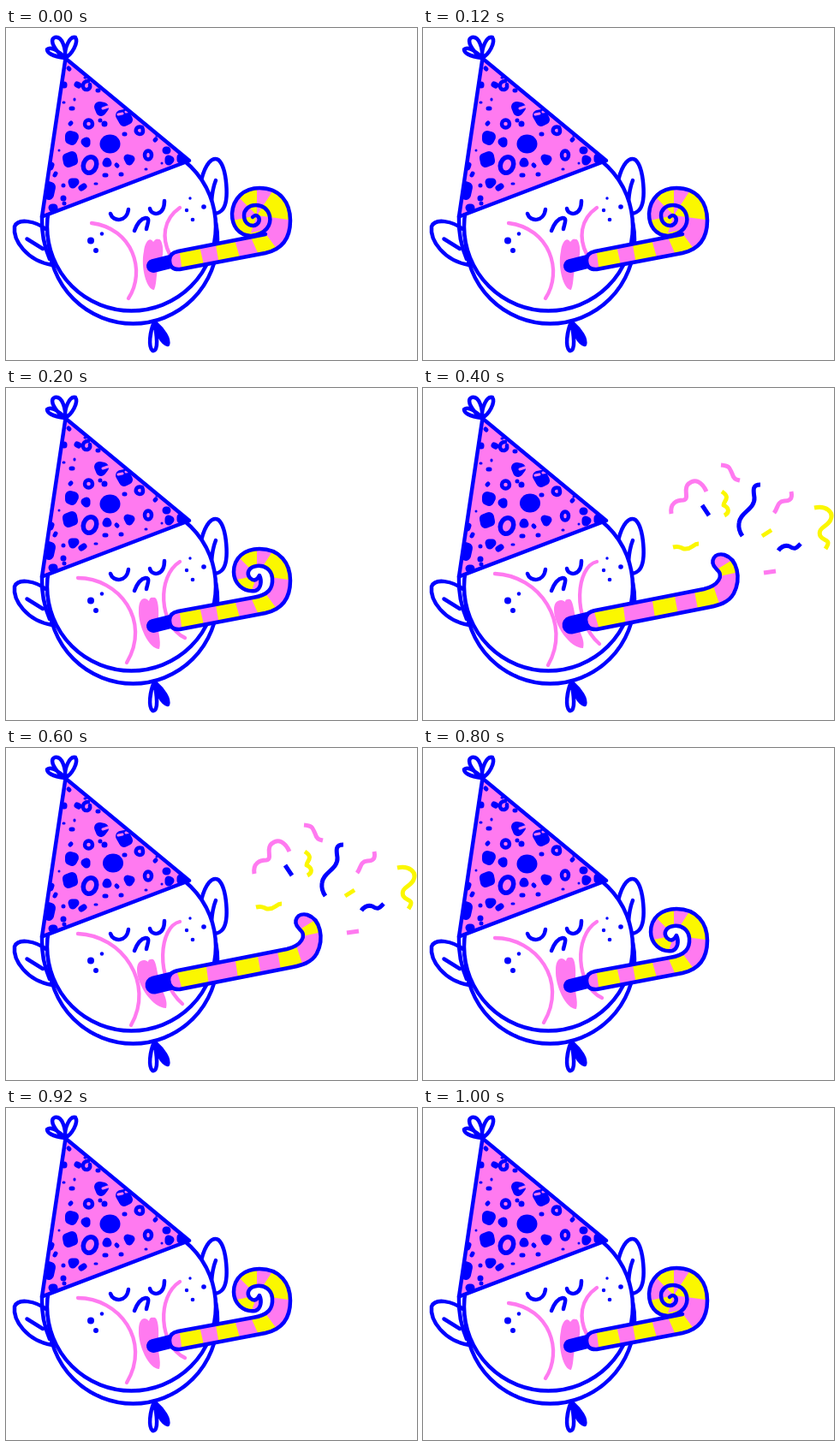
An HTML page that plays this animation: 480x388 px, repeating every 1200 ms.

```html
<!DOCTYPE html>
<html lang="en">
<head>
<meta charset="utf-8">
<title>Party blower</title>
<style>
  html, body { margin: 0; width: 100%; height: 100%; overflow: hidden; background: #fff; }
  svg { display: block; width: 480px; height: 388px; }
  :root { --ink: #0000ff; --pink: #ff7af0; --sun: #fbf700; }
  .ink { fill: none; stroke: var(--ink); stroke-width: 4.5; stroke-linecap: round; stroke-linejoin: round; }
  .ink.paper { fill: #fff; }
  .solid { fill: var(--ink); }
  .blush { fill: none; stroke: var(--pink); stroke-width: 4.3; stroke-linecap: round; }
  .pink { fill: var(--pink); }
  .sun { fill: var(--sun); }
  .mouthpiece { stroke-width: 16; }
  .bits { fill: none; stroke-width: 5; stroke-linejoin: round; }
  .w3 { stroke-width: 3; }
  .w5 { stroke-width: 5; }
  .w7 { stroke-width: 7; }
  .w9 { stroke-width: 9; }
  .w12 { stroke-width: 12; }
  .pose { visibility: hidden; animation: 1.2s step-end infinite; }
  .rest { animation-name: rest; }
  .puff { animation-name: puff; }
  .blow { animation-name: blow; }
  .coiled { animation-name: coiled; }
  @keyframes rest { 0% { visibility: visible } 16.6667% { visibility: hidden } 83.3333%, 100% { visibility: visible } }
  @keyframes puff {
    0% { visibility: hidden } 16.6667% { visibility: visible } 33.3333% { visibility: hidden }
    66.6667% { visibility: visible } 83.3333%, 100% { visibility: hidden }
  }
  @keyframes blow { 0% { visibility: hidden } 33.3333% { visibility: visible } 66.6667%, 100% { visibility: hidden } }
  @keyframes coiled { 0% { visibility: visible } 33.3333% { visibility: hidden } 66.6667%, 100% { visibility: visible } }
</style>
</head>
<body>
<svg viewBox="0 0 480 388">
  <defs>
    <path id="hat" d="M69.500 35.500L42 220.500L214 155Z"/>
    <path id="coil" d="M201 261L290 244C271 243 264 231 264 217C265 199 278 187 296 187C320 187 332 204 332 225C332 248 321 259 303 263L203 282Q191 283 191 271Q191 263 201 261Z"/>
    <path id="curl" d="M201 261L288 245C307 242 312 234 311 222C310 212 302 207 293 208C284 209 280 216 285 222C289 226 293 225 296 219C299 225 298 235 291 237C277 239 266 228 266 215C266 198 279 188 296 188C320 188 332 205 332 225C332 248 321 259 303 263L203 282Q191 283 191 271Q191 263 201 261Z"/>
    <path id="horn" d="M201 260L328 235C345 231 352 219 343 212C333 202 341 192 352 195C367 200 372 222 363 240C357 251 345 254 335 256L203 282Q191 283 190 271Q190 262 201 260Z"/>
    <clipPath id="inHat"><use href="#hat"/></clipPath>
    <clipPath id="inCoil"><use href="#coil"/></clipPath>
    <clipPath id="inCurl"><use href="#curl"/></clipPath>
    <clipPath id="inHorn"><use href="#horn"/></clipPath>

    <path id="bands" class="sun" d="M202 255L206 286H233L225 250ZM244 248L250 282H277L266 244ZM284 240L298 272L322 266L300 236ZM293 219L268 194L293 180ZM293 219L317 182L340 188L338 225ZM293 219L260 226L283 248Z"/>

    <g id="spots" class="ink">
      <path class="w3" d="M67 87h1M80 83v1M92 58h1M104 182h2M176 126h0M182 158h0M163 165h1M62 143h0"/>
      <path class="w5" d="M73 47l1 1M76 94h2M107 73h1M75 112l1-1M110 108h0M138 124h1M129 160l1 1M115 172h2M58 170l-1 2M67 184h0M68 205h0M134 171h1M174 131l1-1"/>
      <path class="w7" d="M68 66v1M83 66l2 1M115 112h0M153 97l3-1M88 187l3-2M67 199h0M53 160l-1 3"/>
      <path class="w9 solid" d="M92 133l2-1 0 3zM118 156l1 2-2 0zM142 152l4 1-2 3zM77 180l4 0-3 3zM54 210l2 0 0 3zM190 153l2 1-2 2zM204 151l3 3-3 0zM187 143h1"/>
      <path class="w12 solid" d="M75 126l4 1-2 4-2-1zM72 152l5-2 1 5-5 2zM109 92l5 1-3 4zM134 102l5-1 3 6-4 2zM49 185l3 1-2 9z"/>
      <path d="M96 62C88 62 88 73 95 72Q99 71 98 66M159 116C151 113 149 123 156 124Q162 124 159 116"/>
      <circle cx="96.500" cy="112" r="4.500"/>
      <ellipse cx="98" cy="160" rx="7.500" ry="9.500" style="stroke-width:5.500" transform="rotate(20 98 160)"/>
      <ellipse cx="166" cy="148.500" rx="4" ry="5"/>
      <path class="w3" style="stroke:var(--pink)" d="M113 94l6-2M136 100l-5 1M140 98l6-1"/>
    </g>

    <g id="body">
      <path class="ink paper" d="M48 236C34 225 14 222 10 232C8 248 24 272 54 277Z"/>
      <path class="ink" d="M24.500 246.500L43 258"/>
      <path class="ink paper" d="M228 178C233 158 241 150 248 154C258 163 261 202 253 212Q250 216 244 217Z"/>
      <path class="ink" d="M245 178Q241 188 240 203"/>
      <path class="ink paper" d="M173 344C168 355 166 372 171 377C179 379 176 357 173 344Z"/>
      <path class="ink solid" style="fill:var(--ink)" d="M175 345C175 356 183 369 189 370C191 363 184 353 175 345Z"/>
      <path class="ink" d="M42 220Q41 247 51 270"/>
      <circle class="ink paper" cx="148.500" cy="247" r="98.500"/>
      <circle class="ink paper" cx="146.500" cy="232" r="98.500"/>
      <path class="ink" d="M122 217C125 227 141 227 143 212M168 211C170 220 185 220 185 202M150 237C153 229 157 223 163 222C169 222 165 229 164 235"/>
      <path class="ink paper" d="M69 35C61 34 48 31 48 25C53 21 63 28 69 35C59 29 49 14 57 11C66 9 70 25 69 35C68 24 74 9 81 11C85 17 77 31 69 35Z"/>
    </g>

    <g id="freckles" class="solid">
      <circle cx="99" cy="248.500" r="4"/><circle cx="112" cy="240.500" r="2.200"/><circle cx="105" cy="260" r="3"/>
      <circle cx="215" cy="199" r="1.700"/><circle cx="231" cy="209" r="2.800"/><circle cx="211" cy="213" r="2.200"/><circle cx="218" cy="224" r="2.300"/>
    </g>
  </defs>

  <rect width="480" height="388" fill="#fff"/>
  <use href="#body"/>
  <use href="#freckles"/>
  <use href="#hat" class="pink"/>

  <g clip-path="url(#inHat)">
    <g class="pose coiled"><use href="#spots"/><ellipse class="solid" cx="121.500" cy="135.500" rx="12" ry="11"/></g>
    <g class="pose blow"><use href="#spots" transform="translate(0 1)"/><ellipse class="solid" cx="125" cy="134.500" rx="12" ry="11"/></g>
  </g>
  <use href="#hat" class="ink"/>

  <g class="pose rest">
    <path class="blush" d="M100 228C148 234 164 284 143 316M203 210C183 224 182 246 191 264"/>
    <path class="pink" d="M172 250C168 243 162 250 161 261C157 279 164 306 173 306C177 297 174 285 181 272C186 262 182 245 178 247Q175 245 172 250Z"/>
    <path class="ink mouthpiece" d="M172 278L192 273"/>
    <use href="#coil" class="pink"/>
    <use href="#bands" clip-path="url(#inCoil)"/>
    <path class="ink" d="M303 241L201 261Q191 263 191 271Q191 283 203 282L303 263C321 259 332 248 332 225C332 204 320 187 296 187C278 187 265 199 264 217C264 231 271 242 286 243C304 241 310 230 308 220C306 211 299 207 292 207C283 207 278 213 278 219C278 227 283 231 289 231C295 230 297 225 295 221Q292 217 288 221"/>
  </g>

  <g class="pose puff">
    <path class="blush" d="M84 222C132 222 170 272 141 321M203 203C176 220 178 277 209 292"/>
    <path class="pink" d="M167 249C162 243 155 246 155 259C154 278 167 305 179 305C182 295 176 284 178 270C179 256 177 243 172 245Q168 244 167 249Z"/>
    <path class="ink mouthpiece" d="M172 278L192 273"/>
    <use href="#curl" class="pink"/>
    <use href="#bands" clip-path="url(#inCurl)"/>
    <use href="#curl" class="ink"/>
  </g>

  <g class="pose blow">
    <path class="blush" d="M84 217C136 219 174 275 146 324M203 203C179 208 173 270 206 299"/>
    <path class="pink" d="M166 250C161 246 153 248 153 259C153 278 172 304 187 304C190 293 181 284 178 268C175 252 174 245 169 247Q166 247 166 250Z"/>
    <path class="ink" style="stroke-width:21" d="M173 277L198 271"/>
    <use href="#horn" class="pink"/>
    <path class="sun" clip-path="url(#inHorn)" d="M198 255L207 286H238L233 248ZM267 242L272 276H300L293 238ZM316 232L322 264H350L338 228ZM340 214L366 198L374 214L346 220Z"/>
    <use href="#horn" class="ink"/>
    <g class="bits">
      <path stroke="var(--pink)" d="M290 147C288 135 296 131 304 131C312 130 303 118 310 112C318 105 326 110 331 121M348 90C359 91 358 94 361 100C363 107 366 107 370 108M430 121C432 130 428 132 422 132C413 133 415 140 410 146M398 216L412 214"/>
      <path stroke="var(--sun)" d="M349 121C360 128 351 132 351 137C358 140 358 146 352 149M457 140C471 137 480 145 476 154C473 162 460 163 464 173C468 180 478 176 470 188M396 173L407 166M292 186C300 184 301 187 305 188C314 189 315 182 322 182"/>
      <path stroke="var(--ink)" d="M394 113C384 113 386 120 387 128C388 142 370 145 369 158Q368 166 373 173M326 137L334 149M415 190C420 183 425 184 428 185C435 190 437 186 441 182"/>
    </g>
  </g>
</svg>
</body>
</html>
```
